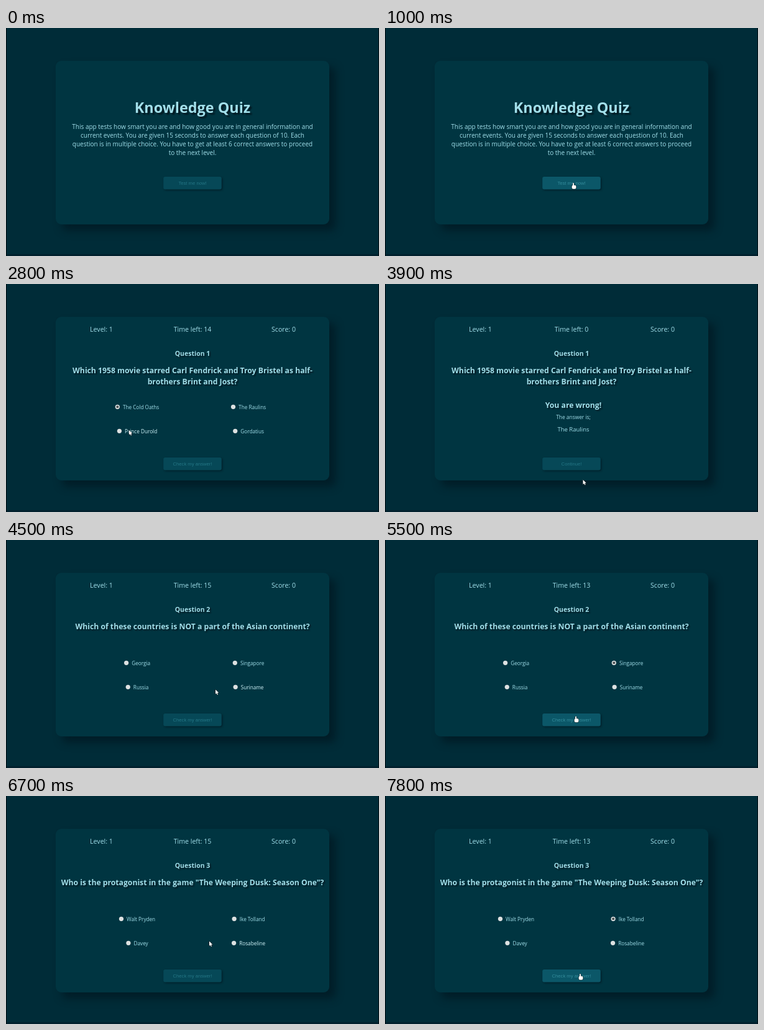
Recreate the animation shown at these times as an HTML page with a canvas. Size 600 px wide and 368 px high, loop 8000 ms.

```html
<!DOCTYPE html>
<html lang="en">
<head>
<meta charset="utf-8">
<title>Knowledge Quiz</title>
<style>
  html, body { margin: 0; width: 100%; height: 100%; overflow: hidden; background: #002c38; }
  canvas { display: block; width: 600px; height: 368px; }
</style>
</head>
<body>
<canvas id="stage"></canvas>
<script>
const W = 600, H = 368, MID = W / 2, LOOP = 8000, STEP = 100, TICK = 700;
const SANS = '"Open Sans", "Noto Sans", sans-serif';
const ARIAL = '"Liberation Sans", Arial, sans-serif';
const TEXT = '#a2dfea', BRIGHT = '#d2f5fb';

const canvas = document.getElementById('stage');
const ctx = canvas.getContext('2d');
const dpr = window.devicePixelRatio || 1;
canvas.width = W * dpr;
canvas.height = H * dpr;

const intro = [
  'This app tests how smart you are and how good you are in general information and',
  'current events. You are given 15 seconds to answer each question of 10. Each',
  'question is in multiple choice. You have to get at least 6 correct answers to proceed',
  'to the next level.'
];

// start, pick and check are times in ms
const rounds = [
  {
    start: 1450, pick: 2600, check: 3300, chosen: 0, answer: 1,
    lines: ['Which 1958 movie starred Carl Fendrick and Troy Bristel as half-', 'brothers Brint and Jost?'],
    options: ['The Cold Oaths', 'The Raulins', 'Prince Durold', 'Gordatius']
  },
  {
    start: 4000, pick: 4900, check: 5700, chosen: 1, answer: 3,
    lines: ['Which of these countries is NOT a part of the Asian continent?'],
    options: ['Georgia', 'Singapore', 'Russia', 'Suriname']
  },
  {
    start: 6300, pick: 7200, check: Infinity, chosen: 1, answer: 1,
    lines: ['Who is the protagonist in the game "The Weeping Dusk: Season One"?'],
    options: ['Walt Pryden', 'Ike Tolland', 'Davey', 'Rosabeline']
  }
];

const at = (x, y) => ({ x, y });
const optionRow = i => 198.3 + 39 * (i >> 1);
const optionMid = i => i % 2 ? 390 : 211;
const introButton = at(303, 250), button = at(307, 284.5);
const leftPick = at(180, optionRow(0)), rightPick = at(367, optionRow(1));

// each move eases to its spot, then the pointer rests there
const entry = { from: 200, spot: at(98, 185) };
const moves = [
  { from: 200, to: 800, spot: introButton },
  { from: 1400, to: 1500, spot: at(318, 311) },
  { from: 1500, to: 2000, spot: at(452, 215) },
  { from: 2100, to: 2400, spot: at(114, 204) },
  { from: 2400, to: 2550, spot: leftPick },
  { from: 2650, to: 2800, spot: at(198, 236) },
  { from: 2800, to: 3100, spot: button },
  { from: 3600, to: 3800, spot: at(318.5, 316) },
  { from: 3900, to: 4000, spot: button },
  { from: 4200, to: 4800, spot: rightPick },
  { from: 5200, to: 5400, spot: at(362, 145) },
  { from: 5400, to: 5500, spot: button },
  { from: 6300, to: 6700, spot: at(327, 234.5) },
  { from: 6700, to: 7000, spot: rightPick },
  { from: 7300, to: 7700, spot: at(314, 287) }
];

const ease = k => k * k * (3 - 2 * k);
const clamp = k => Math.min(1, Math.max(0, k));

function pointerAt(t) {
  if (t < entry.from) return null;
  return moves.reduce((p, { from, to, spot }) => {
    const e = ease(clamp((t - from) / (to - from)));
    return at(p.x + (spot.x - p.x) * e, p.y + (spot.y - p.y) * e);
  }, entry.spot);
}

function shadow(color, offset, blur) {
  ctx.shadowColor = color;
  ctx.shadowOffsetX = ctx.shadowOffsetY = offset * dpr;
  ctx.shadowBlur = blur * dpr;
}

const noShadow = () => shadow('transparent', 0, 0);

function box(x, y, w, h, r, fill) {
  ctx.beginPath();
  ctx.roundRect(x, y, w, h, r);
  ctx.fillStyle = fill;
  ctx.fill();
}

function label(str, x, y, size, { bold = false, color = TEXT, align = 'center', font = SANS } = {}) {
  ctx.font = `${bold ? 700 : 400} ${size}px ${font}`;
  ctx.textAlign = align;
  ctx.fillStyle = color;
  if (bold) shadow('rgba(0,18,26,.75)', size > 20 ? 3 : 2, 2);
  ctx.fillText(str, x, y);
  noShadow();
}

function drawPage() {
  ctx.fillStyle = '#002c38';
  ctx.fillRect(0, 0, W, H);
  shadow('rgba(0,22,31,.65)', 10, 13);
  box(80, 53, 440, 264, 9, '#003541');
  noShadow();
  ctx.fillStyle = '#01202d';
  ctx.fillRect(0, H - 3, W, 3);
  ctx.fillStyle = '#000a0f';
  ctx.fillRect(0, 0, 1, H);
  ctx.fillRect(W - 1, 0, 1, H);
}

function drawButton(str, y, p) {
  const hover = !!p && Math.abs(p.x - MID) < 47 && p.y > y && p.y < y + 20.5;
  shadow('rgba(0,18,26,.6)', 1.5, 3);
  box(MID - 46.8, y, 93.6, 20.5, 3, hover ? '#0b5768' : '#064857');
  noShadow();
  label(str, MID, y + 13.2, 7.66, { color: hover ? '#348c9b' : '#247685', font: ARIAL });
  return hover;
}

function dot(x, y, r, fill) {
  ctx.beginPath();
  ctx.arc(x, y, r, 0, Math.PI * 2);
  ctx.fillStyle = fill;
  ctx.fill();
}

function drawRadio(x, y, on) {
  dot(x, y, 3.6, '#dde1e1');
  if (on) dot(x, y, 2, '#4a5153');
}

// radio and text are centred together in their column
function drawOptions(round, t, p) {
  const r = 3.6, gap = 5;
  round.options.forEach((name, i) => {
    const y = optionRow(i), mid = optionMid(i);
    const hover = !!p && Math.abs(p.y - y) < 10 && Math.abs(p.x - mid) < 85;
    ctx.font = `8.2px ${SANS}`;
    const left = mid - (2 * r + gap + ctx.measureText(name).width) / 2;
    drawRadio(left + r, y, t >= round.pick && i === round.chosen);
    label(name, left + 2 * r + gap, y + 4.1, 8.2, { align: 'left', color: hover ? BRIGHT : TEXT });
  });
}

function drawResult(round) {
  label('You are wrong!', 303, 199.6, 12.2, { bold: true });
  label('The answer is;', 303, 218.4, 8.4);
  label(round.options[round.answer], 303, 237.5, 9.5);
}

function drawIntro(p) {
  label('Knowledge Quiz', MID, 136.5, 23.4, { bold: true });
  intro.forEach((line, i) => label(line, MID, 162.8 + i * 14, 10));
  return drawButton('Test me now!', 240, p);
}

function drawRound(round, t, p) {
  const done = t >= round.check;
  const left = done ? 0 : 15 - Math.floor((t - round.start) / TICK);
  ['Level: 1', 'Time left: ' + left, 'Score: 0'].forEach((str, i) => label(str, MID + (i - 1) * 146.5, 77.2, 10.6));
  label('Question ' + (rounds.indexOf(round) + 1), MID, 115.8, 10.5, { bold: true });
  round.lines.forEach((line, i) => label(line, MID, 144.3 + i * 17.3, 12.2, { bold: true }));
  if (done) drawResult(round);
  else drawOptions(round, t, p);
  return drawButton(done ? 'Continue!' : 'Check my answer!', 280, p);
}

const arrow = new Path2D('M0 0v7.4l1.7-1.5 1.2 2.7 1.2-.5-1.2-2.7 2.3-.2z');
const hand = new Path2D();
hand.roundRect(-.9, 0, 1.8, 6, .9);
hand.roundRect(-2.4, 3.8, 6.8, 6, 2);

function drawPointer(p, shape) {
  ctx.save();
  ctx.translate(p.x, p.y);
  ctx.strokeStyle = '#0a1416';
  ctx.lineJoin = 'round';
  ctx.stroke(shape);
  ctx.fillStyle = '#fff';
  ctx.fill(shape);
  ctx.restore();
}

function render(t) {
  ctx.setTransform(dpr, 0, 0, dpr, 0, 0);
  const p = pointerAt(t);
  const round = rounds.filter(r => t >= r.start).pop();
  drawPage();
  const overButton = round ? drawRound(round, t, p) : drawIntro(p);
  if (p) drawPointer(p, overButton ? hand : arrow);
}

const begin = performance.now();
function loop() {
  const t = (performance.now() - begin) % LOOP;
  render(Math.floor(t / STEP) * STEP);
  requestAnimationFrame(loop);
}
loop();
</script>
</body>
</html>
```
